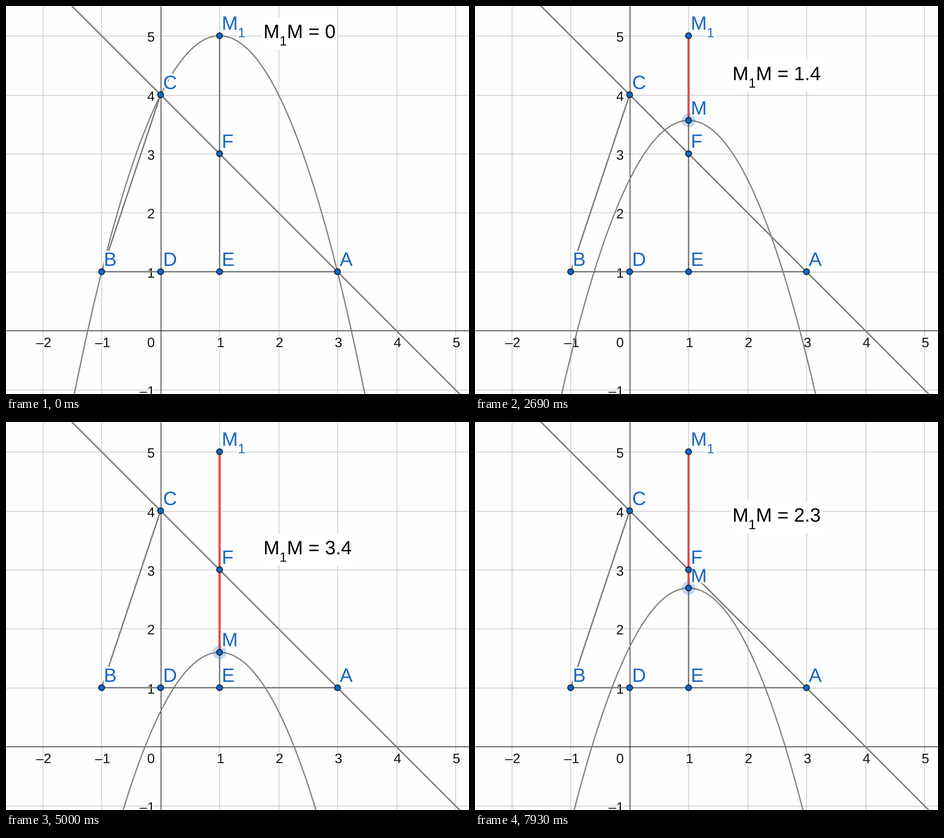
Write a matplotlib script that moves like this. It is 781x654 px and loops after 8000 ms.

```python
import numpy as np
import matplotlib.pyplot as plt
from matplotlib.animation import FuncAnimation
from matplotlib.patches import Circle, PathPatch, Rectangle
from matplotlib.path import Path
from matplotlib.textpath import TextPath

W, H, DPI = 781, 654, 64
LOOP, INTERVAL = 8000, 20
PT = 72 / DPI  # points per pixel
UNIT, X0, Y0 = 99.45, 260.8, 547.35
BLUE, GREY, RED = "#1565c0", "#787878", "#dc4a4a"
BIG, SUB, TICK = 32.5, 22.5, 23
FONT = {"family": "Liberation Sans"}

# Drag bursts: first step, last step (ms), step count, distance M1M reached
DRAGS = [
    (1230, 1830, 6, 0.59), (1960, 1960, 1, 0.705), (2070, 2190, 2, 0.985),
    (2440, 2690, 3, 1.435), (2800, 3170, 4, 1.77), (3280, 3280, 1, 1.83),
    (3420, 3420, 1, 2.0), (4030, 4400, 4, 2.53), (4510, 4750, 3, 3.0),
    (4880, 5370, 5, 4.0), (5980, 5980, 1, 4.17), (6110, 6220, 2, 4.40),
    (6340, 6700, 4, 4.17), (6830, 6940, 2, 4.0), (7330, 7930, 6, 2.31),
]


def drag_steps():
    times, dists = [0], [0.0]
    for start, end, count, reach in DRAGS:
        dists += list(np.linspace(dists[-1], reach, count + 1)[1:])
        times += list(np.linspace(start, end, count))
    return np.array(times), np.array(dists)


TIMES, DISTS = drag_steps()


def px(x, y):
    return X0 + UNIT * x, Y0 - UNIT * y


def glyphs(text, x, y, size):
    """Outline of text with its baseline starting at pixel (x, y)."""
    path = TextPath((0, 0), text, size=size, prop=FONT)
    return Path(path.vertices * [1, -1] + [x, y], path.codes)


def subscripted(x, y, tail=""):
    """M with subscript 1, followed by tail."""
    sub_x = x + 0.833 * BIG
    parts = [glyphs("M", x, y, BIG), glyphs("1", sub_x, y + 12.5, SUB)]
    if tail:
        parts.append(glyphs(tail, sub_x + 0.556 * SUB, y, BIG))
    return Path.make_compound_path(*parts)


def label_pos(x, y):
    return round(x) + 4, round(y) - 10


fig = plt.figure(figsize=(W / DPI, H / DPI), dpi=DPI, facecolor="#fefefe")
ax = fig.add_axes([0, 0, 1, 1])
ax.set(xlim=(0, W), ylim=(H, 0))
ax.axis("off")


def line(points, color=GREY, width=2.3, z=3, snap=False):
    xs, ys = zip(*points)
    return ax.plot(xs, ys, color=color, lw=width * PT, zorder=z, snap=snap,
                   solid_capstyle="butt")[0]


def lettering(path, color, z, outline=6):
    """Filled text over a white outline."""
    back = PathPatch(path, fc="white", ec="white", lw=outline * PT,
                     joinstyle="round", zorder=z)
    front = PathPatch(path, fc=color, lw=0, zorder=z + 0.1)
    ax.add_patch(back)
    ax.add_patch(front)
    return back, front


def dot(center, z):
    return ax.add_patch(Circle(center, 5, fc=BLUE, ec="black", lw=1.1 * PT,
                               zorder=z))


# Grid, axes and tick numbers
for k in range(-2, 6):
    gx, gy = px(k, k)
    line([(gx, 0), (gx, H)], "#c0c0c0", 1, 0, True)
    line([(0, gy), (W, gy)], "#c0c0c0", 1, 0, True)
line([(X0, 0), (X0, H)], "black", 1, 1, True)
line([(0, Y0), (W, Y0)], "black", 1, 1, True)

ticks = []
for k in range(-2, 6):
    text = str(k).replace("-", "\u2013")
    width = 0.556 * TICK * len(text)
    gx, gy = px(k, k)
    left = gx + 1.7 - width / 2 if k else 251 - width
    ticks.append(glyphs(text, left, 575, TICK))
    if k and k > -2:
        ticks.append(glyphs(text, 251 - width, round(gy) + 10, TICK))
lettering(Path.make_compound_path(*ticks), "#111111", 2, 4)

# Fixed construction
NAMED = {"A": (3, 1), "B": (-1, 1), "C": (0, 4),
         "D": (0, 1), "E": (1, 1), "F": (1, 3)}
POINTS = {name: px(*p) for name, p in NAMED.items()}
TOP = px(1, 5)

line([px(-2, 6), px(6, -2)])
line([POINTS["B"], POINTS["A"]])
line([POINTS["B"], POINTS["C"]])
line([POINTS["E"], TOP])

labels = [glyphs(n, *label_pos(*p), BIG) for n, p in POINTS.items()]
labels.append(subscripted(*label_pos(*TOP)))
lettering(Path.make_compound_path(*labels), BLUE, 5)
for center in (*POINTS.values(), TOP):
    dot(center, 8)

# Moving parts
curve_x = np.linspace(X0 - 2 * UNIT, X0 + 4 * UNIT, 300)
curve = line([(0, 0), (1, 1)], "#7f7f7f", 2.1, 3.5)
gap = line([TOP, TOP], RED, 3.6, 4)
halo = ax.add_patch(Circle(TOP, 11.5, fc=BLUE, lw=0, alpha=0.25, zorder=4.5))
point = dot(TOP, 9)
tag = lettering(glyphs("M", 0, 0, BIG), BLUE, 6)
plate = ax.add_patch(Rectangle((432, 19), 127, 54, fc="white", lw=0, zorder=2.5))
caption = ax.add_patch(PathPatch(glyphs("M", 0, 0, BIG), fc="black", lw=0, zorder=7))


def update(frame):
    now = frame * INTERVAL + INTERVAL / 2
    dist = DISTS[np.searchsorted(TIMES, now, side="right") - 1]
    x, y = TOP[0], TOP[1] + dist * UNIT
    moved = dist > 0

    curve.set_data(curve_x, y + (curve_x - x) ** 2 / UNIT)
    gap.set_data([x, x], [TOP[1], y])
    for disc in (halo, point):
        disc.set_center((x, y))
        disc.set_visible(moved)
    tag_path = glyphs("M", *label_pos(x, y), BIG)
    for patch in tag:
        patch.set_path(tag_path)
        patch.set_visible(moved)

    # The caption follows the middle of the red segment
    shift = int(dist * UNIT / 2)
    value = f"{round(dist, 1):g}"
    caption.set_path(subscripted(434.3, 54 + shift, "M = " + value))
    plate.set_y(19 + shift)
    plate.set_width(127 if len(value) == 1 else 154)
    return curve, gap, halo, point, *tag, plate, caption


anim = FuncAnimation(fig, update, frames=LOOP // INTERVAL, interval=INTERVAL,
                     repeat=True, repeat_delay=0)
plt.show()
```
